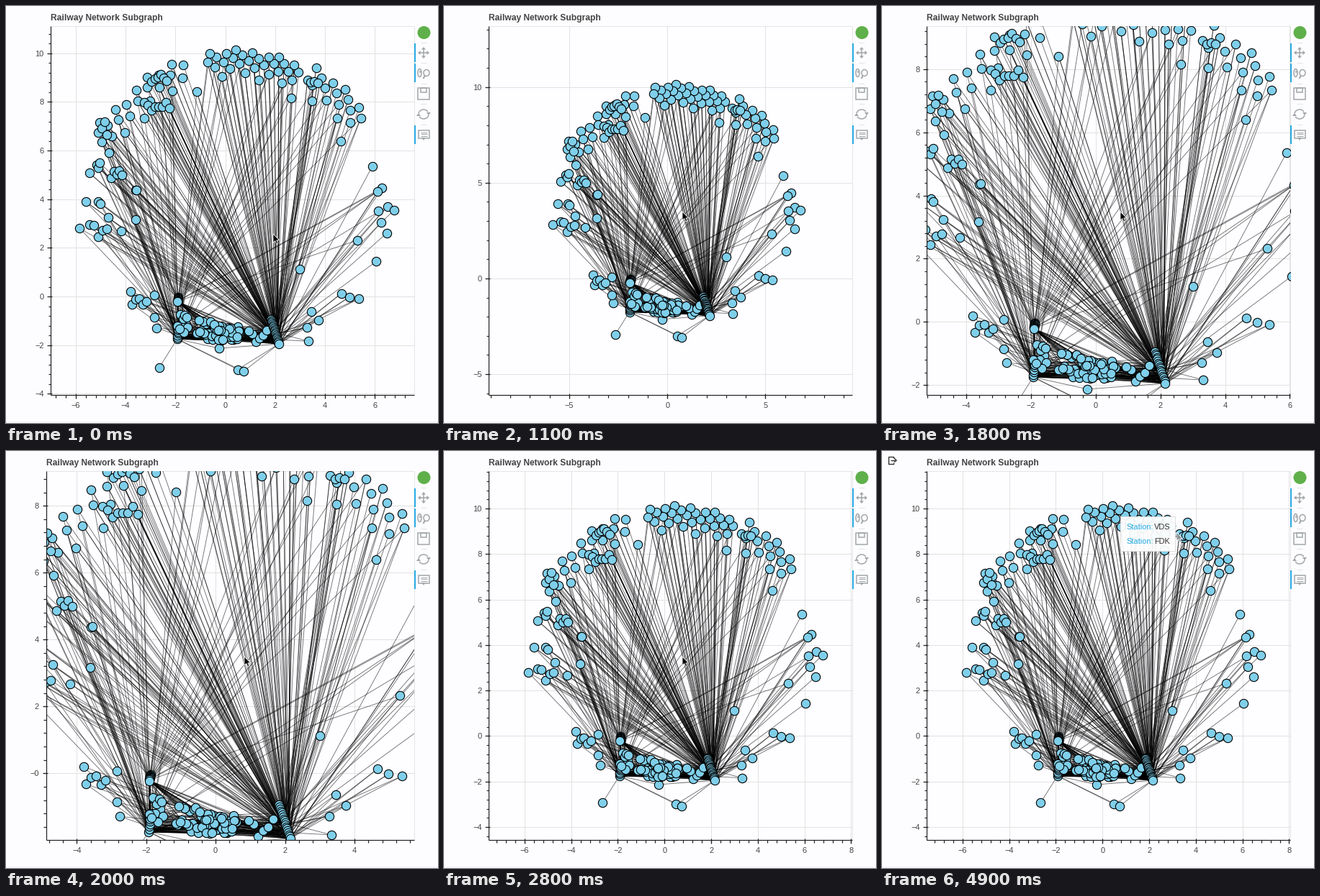
A matplotlib script for the animation above (5 s loop, 600 by 580 pixels).

```python
import numpy as np
import matplotlib.pyplot as plt
from matplotlib.animation import FuncAnimation
from matplotlib.collections import LineCollection
from matplotlib.patches import Arc, Circle, Polygon, Rectangle

W, H, FRAMES, INTERVAL = 600, 580, 50, 100
PX = 0.72                                   # points per pixel at 100 dpi
RIGHT, TOP, BOTTOM = 567, 28, 541
ZOOM_PX, ZOOM_DATA = (331, 286), (0.763, 3.49)
ASPECT = 0.977
INK, ICON, BLUE, SKY = "#444444", "#a1a6a9", "#26aae1", "#7fcfea"

rng = np.random.default_rng(4)

# Stand-alone stations in data units.
SINGLES = [
    (5.9, 5.36), (6.29, 4.46), (6.12, 4.33), (6.5, 3.7), (6.77, 3.56),
    (6.15, 3.51), (6.24, 3.04), (6.47, 2.6), (5.31, 2.32), (6.05, 1.44),
    (3, 1.12), (4.66, .13), (4.98, -.02), (5.36, -.09), (3.46, -.63),
    (3.75, -.97), (3.28, -1.28), (3.33, -1.84), (.5, -3), (.73, -3.08),
    (-.25, -2.13), (-2.65, -2.92), (-2.76, -1.29), (-2.85, -.85),
    (-2.85, .07), (-3.8, .2), (-5.45, 5.08), (-5.6, 3.9), (-3.61, 3.17),
    (-4.7, 3.25), (-4.19, 2.68), (-5.84, 2.8),
]

# Bands on the fan's ellipse: start and end angle, inner and outer radius, count.
FAN_CENTER, FAN_RADII = (.45, 2.8), (6.3, 7.2)
BANDS = [(37, 61, .83, 1.06, 17), (65, 101, .82, 1.02, 31), (108, 152, .82, 1.04, 24)]

# Station groups: centre x, centre y, half width, half height, count.
OUTER_GROUPS = [
    (-4.9, 6.9, .14, .3, 4), (-5.1, 5.36, .07, .22, 3), (-4.36, 5, .22, .2, 5),
    (-3.58, 4.37, .02, .03, 2), (-5.05, 3.83, .04, .07, 2),
    (-5.1, 2.65, .35, .32, 5), (-2.75, 7.8, .5, .2, 8), (-2.65, 8.95, .3, .2, 6),
    (3.5, 8.8, .2, .12, 4), (-3.45, -.2, .28, .22, 5),
]
CORE_GROUPS = [(-1.72, -1.1, .2, .4, 12), (-.3, -1.4, .85, .44, 40),
               (.1, -1.6, .5, .24, 18), (1.3, -1.6, .35, .28, 6)]


def scatter_group(cx, cy, half_w, half_h, count):
    x = cx + half_w * np.linspace(-1, 1, count)
    return np.column_stack([x, cy + half_h * rng.uniform(-1, 1, count)])


def fan_band(start, end, inner, outer_r, count):
    angle = np.radians(np.linspace(start, end, count))
    spread = np.sqrt(np.arange(count) * .618 % 1)
    r = inner + (outer_r - inner) * spread
    unit = np.column_stack([np.cos(angle), np.sin(angle)])
    return np.array(FAN_CENTER) + r[:, None] * unit * FAN_RADII


def row(start, end, count):
    u = np.linspace(0, 1, count)[:, None]
    return (1 - u) * np.array(start) + u * np.array(end)


outer = np.vstack([SINGLES] + [fan_band(*b) for b in BANDS]
                  + [scatter_group(*g) for g in OUTER_GROUPS])
core = np.vstack([scatter_group(*g) for g in CORE_GROUPS])
rng.shuffle(core)
west = row((-1.93, -1.75), (-1.86, -1.2), 8)
north = row((-1.88, -.03), (-1.91, -.22), 9)
east = row((1.83, -.95), (2.15, -1.95), 18)
nodes = np.vstack([outer, west, core, north, east])


def pick(hub, bias=1.0):
    return hub[int(len(hub) * rng.random() ** bias)]


def build_edges():
    edges = []
    for p in outer:
        x, y = p
        if y < -2:
            edges.append((p, west[0]))
            if x > -1:
                edges.append((p, east[-1]))
        elif x < -2.5 and y < 1:
            edges += [(p, pick(west, 3)), (p, pick(core))]
        elif x > 3 and y < 0:
            edges += [(p, pick(east, .4)), (p, pick(east, .4))]
        else:
            edges.append((p, pick(east, .4)))
            if rng.random() < .55:
                edges.append((p, pick(east, .4)))
            if rng.random() < (.75 if x < -3 else .22):
                edges.append((p, pick(west, 3)))
            if rng.random() < (.12 if x < -3 else .22):
                edges.append((p, pick(north)))
    for p in core:
        edges += [(p, pick(west, 3)), (p, pick(east, .3))]
        if rng.random() < .45:
            edges.append((p, north[-1]))
    edges += [(pick(west, 3), pick(east, .3)) for _ in range(25)]
    edges += [(pick(north), pick(west)) for _ in range(12)]
    return np.array(edges)


edges = build_edges()

fig = plt.figure(figsize=(6, 5.8), dpi=100, facecolor="#fdfcfe")
ax = fig.add_axes([0, 0, 1, 1])
ax.set(xlim=(0, W), ylim=(H, 0))
ax.axis("off")


def line_set(color, width, z):
    lines = LineCollection([], colors=color, linewidths=width * PX, zorder=z)
    return ax.add_collection(lines, autolim=False)


def label(x, y, text, size=11, color=INK, z=6, **kw):
    return ax.text(x, y, text, fontsize=size * PX, color=color, zorder=z,
                   family="Liberation Sans", va="baseline", **kw)


def stroke(xs, ys, color=ICON, width=1.5, z=6):
    return ax.plot(xs, ys, color=color, lw=width * PX, zorder=z,
                   solid_capstyle="butt")[0]


def arc(x, y, w, h, start=0, end=360):
    ax.add_patch(Arc((x, y), w, h, theta1=start, theta2=end, ec=ICON,
                     lw=1.5 * PX, zorder=6))


def arrow_head(tip, direction, length=3.5, half=3):
    tip, d = np.array(tip), np.array(direction)
    back, side = tip - d * length, d[::-1] * half
    ax.add_patch(Polygon([tip, back + side, back - side], fc=ICON, ec="none", zorder=6))


plot_area = ax.add_patch(Rectangle((62, TOP), RIGHT - 62, BOTTOM - TOP,
                                   fc="#fefdff", ec="#e5e5e5", lw=PX, zorder=0))
grid = line_set("#e2e2e2", 1, 1)
edge_lines = line_set((0, 0, 0, .55), .9, 2)
node_dots = ax.scatter(*nodes.T, s=(12.3 * PX) ** 2, c=SKY, edgecolors="black",
                       linewidths=1.1 * PX, zorder=3)
axis_lines = line_set("#222222", 1.2, 4)
title = label(62, 20, "Railway Network Subgraph", 12, weight="bold")
x_labels = [label(0, 559, "", ha="center") for _ in range(14)]
y_labels = [label(0, 0, "", ha="right") for _ in range(14)]
stroke([0, W], [578, 578], "#f1f1f3", 1)


def draw_toolbar():
    cx = 580
    ax.add_patch(Circle((cx + .5, 37), 9, fc="#5fb04a", ec="none", zorder=6))
    for y in (65, 93, 179):
        stroke([567.5, 567.5], [y - 13, y + 13], BLUE, 2)
    for y in np.linspace(51, 164.5, 5):
        stroke([cx - 4, cx + 4], [y, y], "#e2e4e5", 1)
    # pan
    stroke([cx - 7, cx + 7], [65, 65])
    stroke([cx, cx], [58, 72])
    for dx, dy in ((1, 0), (-1, 0), (0, 1), (0, -1)):
        arrow_head((cx + 8 * dx, 65 + 8 * dy), (dx, dy))
    # wheel zoom
    arc(cx - 5.5, 93, 5, 11)
    arc(cx + 4, 93, 8, 9)
    stroke([cx - 5.5, cx - 5.5], [90, 93])
    stroke([cx + 2, cx - .5], [96.5, 101], width=2)
    # save
    ax.add_patch(Rectangle((572, 114), 16, 16, fc="none", ec=ICON, lw=1.5 * PX, zorder=6))
    ax.add_patch(Rectangle((576, 114), 8, 5.5, fc="none", ec=ICON, lw=1.5 * PX, zorder=6))
    # reset
    arc(cx, 150.5, 14, 13, 190, 330)
    arc(cx, 150.5, 14, 13, 10, 150)
    arrow_head((cx + 7, 152), (0, 1), 4)
    arrow_head((cx - 7, 149), (0, -1), 4)
    # hover
    ax.add_patch(Rectangle((573, 173), 14.5, 10.5, fc="none", ec=ICON, lw=1.5 * PX, zorder=6))
    arrow_head((cx, 187), (0, 1), 4, 2.5)
    for y in (176, 178.3, 180.6):
        stroke([575.5, 585], [y, y], width=1)


draw_toolbar()

export_icon = [
    stroke([16, 16, 8.5, 8.5, 16, 16], [10, 7.5, 7.5, 18, 18, 15.5], "#333333", 1.4),
    stroke([11.5, 19.5], [12.8, 12.8], "#333333", 1.4),
    stroke([17, 19.8, 17], [10, 12.8, 15.6], "#333333", 1.4),
]
tooltip = [ax.add_patch(Rectangle((331, 91), 76, 48, fc=(1, 1, 1, .94),
                                  ec="#dddddd", lw=PX, zorder=7))]
for y, code in ((109, "VDS"), (129, "FDK")):
    tooltip += [label(339, y, "Station:", color=BLUE, z=8),
                label(378, y, code, color="#333333", z=8)]

ARROW = np.array([(0, 0), (0, 12), (2.8, 9.6), (4.8, 14), (6.8, 13.1),
                  (4.9, 8.9), (8.6, 8.7)])
cursor = ax.add_patch(Polygon(ARROW, fc="black", ec="white", lw=.8 * PX, zorder=9))

ZOOM_TIMES = [0, 500, 1100, 1500, 1900, 2000, 2400, 2700]
ZOOM_SCALES = [34.62, 34.62, 27.25, 37.9, 47.6, 47.6, 35.3, 32.4]
MOVE_TIMES = [0, 400, 3100, 3500, 3600, 3800]


def tick_values(low, high):
    step = min((1, 2, 5, 10), key=lambda s: abs(6 - (high - low) / s))

    def multiples(s):
        return np.arange(np.ceil(low / s), np.floor(high / s) + 1) * s
    return multiples(step), multiples(step / 5)


def set_labels(texts, values, place):
    for i, text in enumerate(texts):
        shown = i < len(values)
        text.set_visible(shown)
        if shown:
            text.set_text(f"{values[i]:g}".replace("-", "\u2212"))
            text.set_position(place(values[i]))


def update(frame):
    t = frame * INTERVAL
    scale = np.exp(np.interp(t, ZOOM_TIMES, np.log(ZOOM_SCALES)))
    sy = scale * ASPECT
    y0 = ZOOM_PX[1] + ZOOM_DATA[1] * sy
    y_major, y_minor = tick_values((y0 - BOTTOM) / sy, (y0 - TOP) / sy)

    # The frame widens when every y label has a single character.
    left = 62 if any(v < 0 or v >= 10 for v in y_major) else 55.5
    x_low = ZOOM_DATA[0] + (62 - ZOOM_PX[0]) / scale
    x_high = ZOOM_DATA[0] + (RIGHT - ZOOM_PX[0]) / scale
    sx = (RIGHT - left) / (x_high - x_low)
    x_major, x_minor = tick_values(x_low, x_high)

    def px(x):
        return left + (x - x_low) * sx

    def py(y):
        return y0 - y * sy

    def to_pixels(points):
        return np.stack([px(points[..., 0]), py(points[..., 1])], axis=-1)

    plot_area.set_bounds(left, TOP, RIGHT - left, BOTTOM - TOP)
    edge_lines.set_segments(to_pixels(edges))
    node_dots.set_offsets(to_pixels(nodes))
    for artist in (edge_lines, node_dots):
        artist.set_clip_path(plot_area)

    grid.set_segments([[(px(v), TOP), (px(v), BOTTOM)] for v in x_major] +
                      [[(left, py(v)), (RIGHT, py(v))] for v in y_major])
    ticks = [[(left, TOP), (left, BOTTOM)], [(left, BOTTOM), (RIGHT, BOTTOM)]]
    for xs, ys, inner, out in ((x_major, y_major, 2, 5), (x_minor, y_minor, 0, 3.5)):
        ticks += [[(px(v), BOTTOM - inner), (px(v), BOTTOM + out)] for v in xs]
        ticks += [[(left - out, py(v)), (left + inner, py(v))] for v in ys]
    axis_lines.set_segments(ticks)
    set_labels(x_labels, x_major, lambda v: (px(v), 559))
    set_labels(y_labels, y_major, lambda v: (left - 9.5, py(v) + 4))
    title.set_x(left)

    hovering = t >= 3800
    tip = (np.interp(t, MOVE_TIMES, [371, 331, 331, 420, 420, 409]),
           np.interp(t, MOVE_TIMES, [317, 286, 286, 117, 117, 113]))
    cursor.set_xy(ARROW + tip)
    cursor.set_facecolor("#8f9498" if hovering else "black")
    for artist in tooltip:
        artist.set_visible(hovering)
    for artist in export_icon:
        artist.set_visible(t >= 4000)
    return []


anim = FuncAnimation(fig, update, frames=FRAMES, interval=INTERVAL,
                     repeat=True, repeat_delay=0, blit=False)
plt.show()
```
